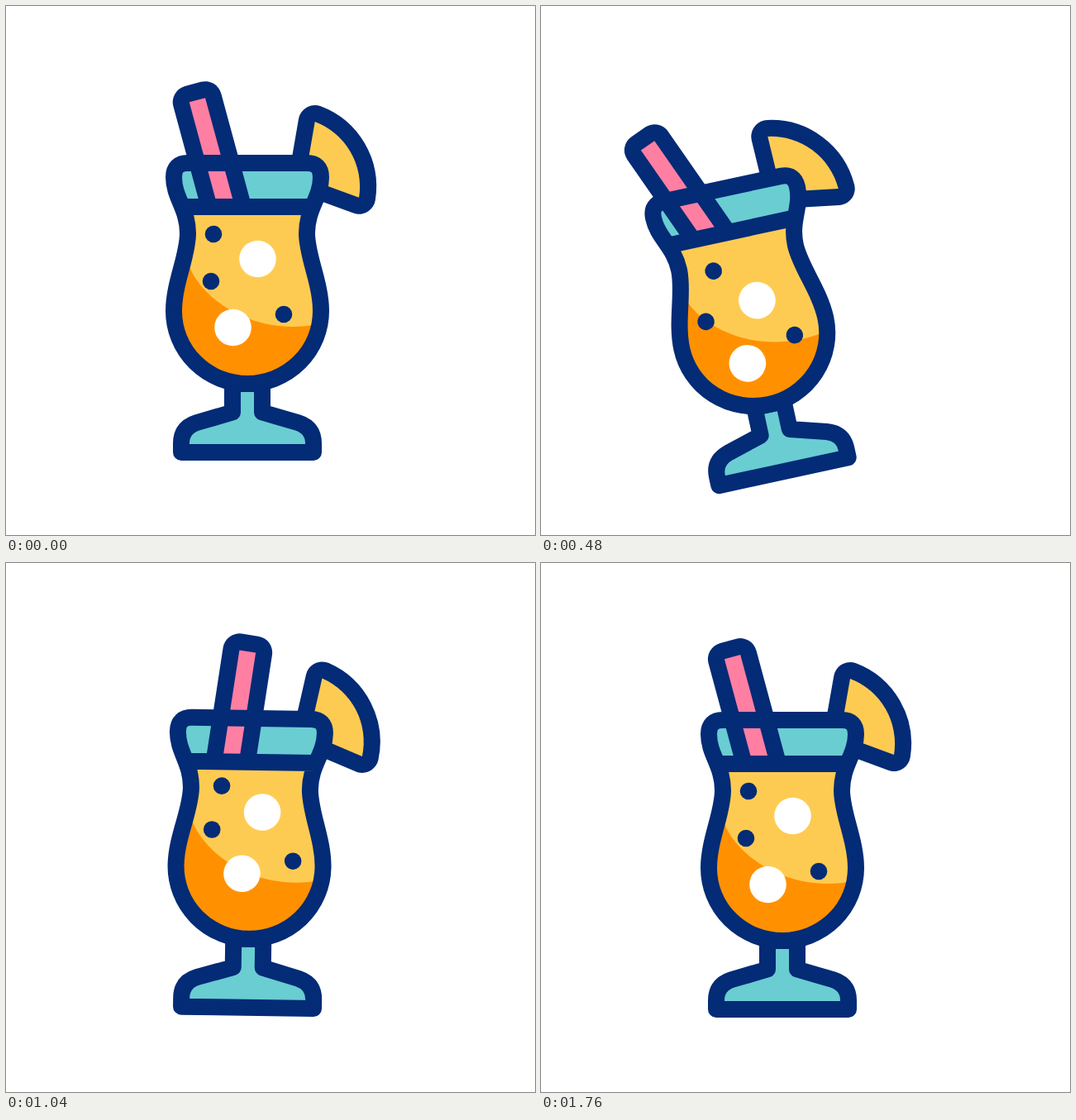
These frames come from a looping animation (640 by 640 pixels, 2 s). An HTML page:

```html
<!DOCTYPE html>
<html lang="en">
<head>
<meta charset="utf-8">
<title>Swinging cocktail</title>
<style>
  html, body { margin: 0; height: 100%; overflow: hidden; background: #fff; }
  svg { display: block; width: 100%; height: 100%; }
  .line { stroke: #032b76; stroke-width: 20; stroke-linejoin: round; }
  .thick { stroke: #032b76; stroke-width: 40; stroke-linejoin: round; paint-order: stroke; }
</style>
</head>
<body>
<svg viewBox="0 0 640 640">
  <defs>
    <clipPath id="bowl">
      <path d="M367 243Q364 257 364 275C364 303 381 335 381 369A89 88 0 0 1 203 369C203 335 220 303 220 275Q220 257 217 243Z"/>
    </clipPath>
  </defs>
  <g id="glass">
    <path id="slice" class="thick" fill="#fecb52" d="M374 140A84 84 0 0 1 427 232L362 208Z"/>
    <path class="line" fill="#69cdd1" d="M274 457V491.5L231 504Q212 510 212 529V540H372V529Q372 510 353 504L310 491.5V457Z"/>
    <path fill="#69cdd1" d="M220 190H364Q381 190 381 207C381 220 372 233 367 243H217C212 233 203 220 203 207Q203 190 220 190Z"/>
    <g id="straw">
      <rect class="thick" fill="#ff7fa3" x="-10" y="-136" width="20" height="136" transform="translate(267 245) rotate(-15.1)"/>
    </g>
    <g clip-path="url(#bowl)">
      <path fill="#fecb52" d="M190 243H400V470H190Z"/>
      <path fill="#ff9100" d="M200 250L223 318C240 356 300 400 378 385L400 470H190Z"/>
    </g>
    <g id="bubbles"></g>
    <path class="line" fill="none" d="M220 190H364Q381 190 381 207C381 232 364 245 364 275C364 303 381 335 381 369A89 88 0 0 1 203 369C203 335 220 303 220 275C220 245 203 232 203 207Q203 190 220 190ZM214 243H370"/>
  </g>
</svg>
<script>
const $ = id => document.getElementById(id);
const place = (id, value) => $(id).setAttribute("transform", value);
const beats = (start, step) => Array.from({ length: 6 }, (_, i) => start + i * step);

// Smoothstep from each value to the next between the given times
function swing(t, times, values) {
  let v = values[0];
  for (let i = 1; i < values.length; i++) {
    const p = (t - times[i - 1]) / (times[i] - times[i - 1]);
    const q = Math.min(1, Math.max(0, p));
    v += (values[i] - values[i - 1]) * q * q * (3 - 2 * q);
  }
  return v;
}

const glassBeats = [20, 417, 833, 1225, 1490];
const garnishBeats = beats(-40, 360);
const bubbleBeats = beats(83, 417);

// Each bubble sinks by (dx, dy), then rises: the deeper it sits, the further
function bubble(r, fill, x, y, dx, dy) {
  const el = document.createElementNS("http://www.w3.org/2000/svg", "circle");
  el.setAttribute("r", r);
  el.setAttribute("fill", fill);
  $("bubbles").append(el);
  const ux = dx / 2 + (y - 270) * .075, uy = (200 - y) * .093;
  return t => {
    el.setAttribute("cx", x + swing(t, bubbleBeats, [0, dx, ux, dx, 0]));
    el.setAttribute("cy", y + swing(t, bubbleBeats, [0, dy, uy, dy, 0]));
  };
}
const small = (...spot) => bubble(10.3, "#032b76", ...spot);
const large = (...spot) => bubble(22.3, "#fff", ...spot);
const bubbles = [
  small(251, 276, 9.5, 9),
  small(248, 333, -9.5, 10),
  small(336, 373, 4, 8.5),
  large(304.5, 306, 0, 25),
  large(274.5, 389, 2.5, 14)
];

function draw(now) {
  const t = Math.floor(now % 2000 / 40) * 40;
  const a = swing(t, glassBeats, [0, -13.6, 8.7, -5.8, 0]);
  // The foot slides as the glass leans
  const x = 292 - .15 * a + .012 * a * a;
  const y = 550 - 2.55 * a - .055 * a * a;
  place("glass", `translate(${x} ${y}) rotate(${a}) translate(-292 -550)`);
  place("straw", `rotate(${swing(t, garnishBeats, [0, -2.5, -14.5, 23, -8, 0])} 270 245)`);
  place("slice", `rotate(${swing(t, garnishBeats, [0, -6, -19, 2, -16.3, 0])} 366 215)`);
  for (const move of bubbles) move(t);
}

let start;
function tick(now) {
  start ??= now;
  draw(now - start);
  requestAnimationFrame(tick);
}
draw(0);
requestAnimationFrame(tick);
</script>
</body>
</html>
```
